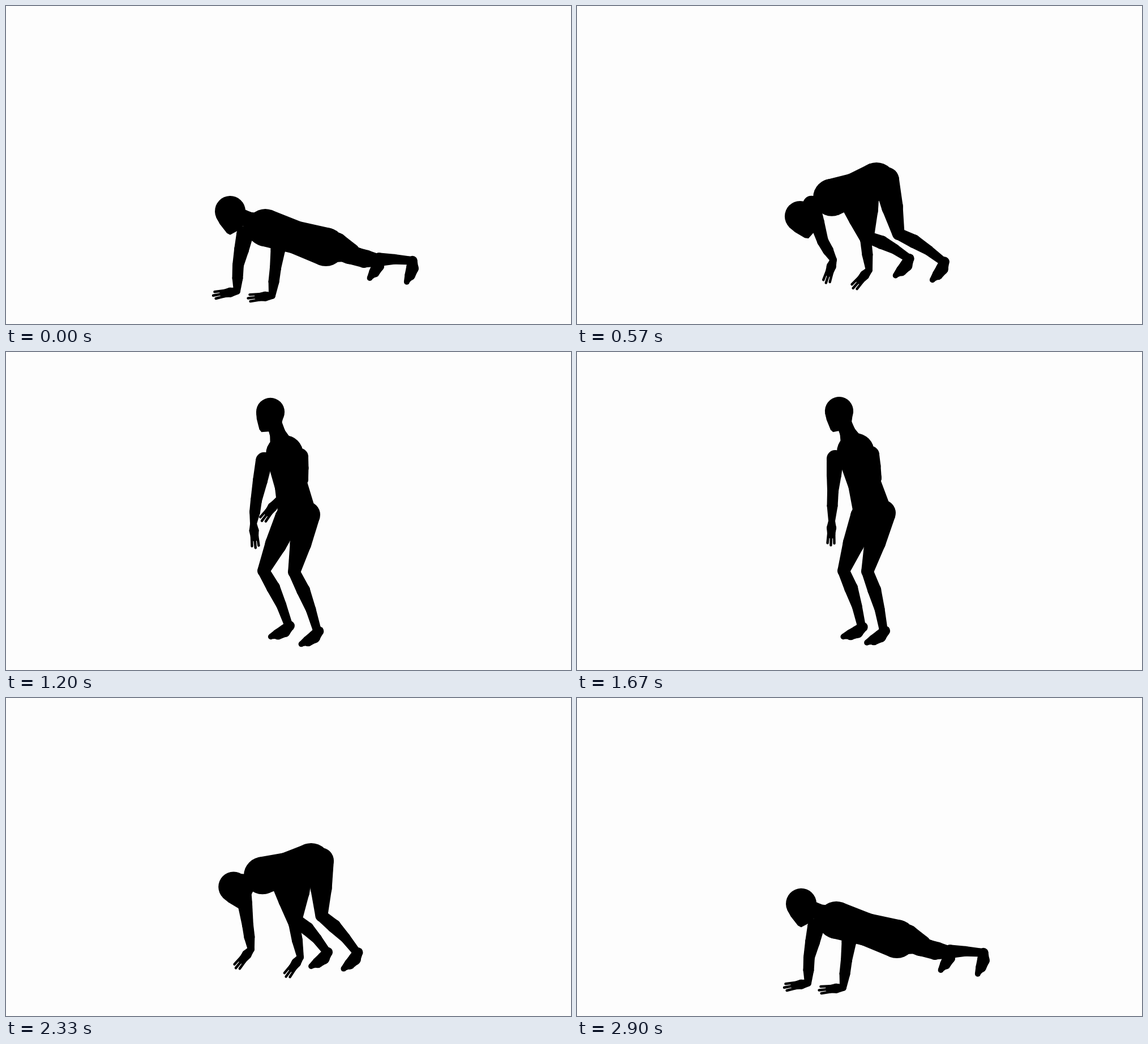
Recreate the animation shown at these times as an HTML page with a canvas. Size 998x561 px, loop 2.93 s.

```html
<!DOCTYPE html>
<html lang="en">
<head>
<meta charset="utf-8">
<title>Burpee</title>
<style>
html, body { margin: 0; width: 100%; height: 100%; overflow: hidden; background: #fdfdfd; }
canvas { display: block; }
</style>
</head>
<body>
<canvas id="stage" width="998" height="561"></canvas>
<script>
const ctx = document.getElementById('stage').getContext('2d');
const LOOP = 2930, FLOOR = 505, RAD = Math.PI / 180;

// upper: head, chest, far elbow and wrist, near elbow and wrist, head tilt, wrist bend.
// legs: pelvis, far knee and ankle, near knee and ankle.
// Shoulders, hips, hands and feet follow from these.
const plank = {
  upper: [396, 362, 458, 391, 410, 457, 408, 503, 476, 462, 470, 511, -24, 77],
  legs: [565, 425, 605, 440, 655, 444, 632, 451, 713, 449]
};
const spring = {
  upper: [394, 371, 450, 338, 434, 415, 453, 448, 510, 412, 516, 466, -45, 48],
  legs: [529, 310, 514, 408, 583, 443, 568, 402, 645, 449]
};
const twist = {
  upper: [467, 106, 492, 180, 442, 262, 437, 303, 524, 225, 478, 264, 0, -12],
  legs: [515, 290, 455, 386, 498, 479, 509, 388, 549, 489]
};
const ready = {
  upper: [463, 104, 492, 176, 452, 245, 450, 298, 528, 222, 515, 275, -8, 0],
  legs: [523, 287, 471, 386, 502, 481, 513, 387, 541, 488]
};
const fold = {
  upper: [414, 214, 482, 245, 448, 318, 453, 375, 512, 300, 484, 374, -40, -5],
  legs: [550, 299, 481, 389, 503, 481, 522, 387, 541, 488]
};
const dive = {
  upper: [402, 333, 453, 313, 427, 400, 433, 443, 509, 398, 520, 457, -45, 47],
  legs: [539, 290, 512, 391, 564, 445, 557, 384, 617, 446]
};

// Raises every point in proportion to its height above the floor.
function stretch(pose, k) {
  const lift = (list, points) => list.map((v, i) => i % 2 && i < points ? v + k * (v - FLOOR) : v);
  return { upper: lift(pose.upper, 12), legs: lift(pose.legs, 10) };
}

const high = stretch(plank, .03), low = stretch(plank, -.04), tall = stretch(ready, .055);
const upperKeys = [[0, plank], [160, high], [370, high], [570, spring], [1020, fold], [1200, twist],
  [1430, tall], [1670, ready], [1970, fold], [2330, dive], [2620, low], [2710, low]];
const legKeys = [[0, plank], [420, plank], [570, spring], [740, fold], [1020, fold], [1200, twist],
  [1430, tall], [1670, ready], [1970, fold], [2190, fold], [2330, dive], [2540, plank]];

// Smooth curve through the looping keys, without overshoot.
function sample(keys, part, t) {
  const n = keys.length;
  let i = n - 1;
  while (keys[i][0] > t) i--;
  const [a, b, c, d] = [i - 1, i, i + 1, i + 2].map(k => {
    const [time, pose] = keys[(k + n) % n];
    return { time: time + Math.floor(k / n) * LOOP, at: pose[part] };
  });
  const span = c.time - b.time, u = (t - b.time) / span;
  const slope = (p, q, j) => (q.at[j] - p.at[j]) / (q.time - p.time);
  const tangent = (s, r) => s * r > 0 ? 2 * s * r / (s + r) : 0;
  return b.at.map((from, j) => {
    const mid = slope(b, c, j), gap = c.at[j] - from;
    const m0 = tangent(slope(a, b, j), mid) * span;
    const m1 = tangent(mid, slope(c, d, j)) * span;
    return from + u * (m0 + u * (3 * gap - 2 * m0 - m1 + u * (m0 + m1 - 2 * gap)));
  });
}

const pairs = list => Array.from({ length: list.length / 2 }, (_, i) => [list[2 * i], list[2 * i + 1]]);
const shift = ([x, y], dx, dy) => [x + dx, y + dy];
const angle = (a, b) => Math.atan2(b[1] - a[1], b[0] - a[0]) / RAD;
const reach = ([x, y], deg, len) => [x + Math.cos(deg * RAD) * len, y + Math.sin(deg * RAD) * len];

function fill(points) {
  ctx.beginPath();
  points.forEach(p => ctx.lineTo(...p));
  ctx.fill();
}

function disc(p, r) {
  ctx.beginPath();
  ctx.arc(...p, r, 0, 7);
  ctx.fill();
}

// Maps a share along a-b and a sideways offset to the stage.
function along(a, b) {
  const dx = b[0] - a[0], dy = b[1] - a[1], len = Math.hypot(dx, dy) || 1;
  return (u, v) => [a[0] + dx * u - dy / len * v, a[1] + dy * u + dx / len * v];
}

// Tapered body part; each ring is a radius and a shift towards the back.
function limb(a, b, ...rings) {
  const at = along(a, b), left = [], right = [];
  rings.forEach(([r, back = 0], i) => {
    const u = i / (rings.length - 1);
    left.push(at(u, r - back));
    right.unshift(at(u, -r - back));
    disc(at(u, -back), r);
  });
  fill([...left, ...right]);
}

function arm(shoulder, elbow, wrist, bend) {
  limb(shoulder, elbow, [15], [13], [10]);
  limb(elbow, wrist, [10], [9.5], [6]);
  const at = along(wrist, reach(wrist, angle(elbow, wrist) + bend, 44));
  limb(wrist, at(.55, 0), [6], [8.5], [7]);
  for (const side of [-1, 0, 1]) {
    ctx.beginPath();
    ctx.moveTo(...at(.5, side * 5));
    ctx.lineTo(...at(.97 - .08 * side * side, side * 6));
    ctx.stroke();
  }
}

function leg(hip, knee, ankle, turn) {
  limb(hip, knee, [23], [19], [11]);
  limb(knee, ankle, [10.5], [12, 3], [9, 3], [7.5]);
  // The foot gives way to about half the tilt of the shin.
  const toe = reach(ankle, 100 + turn + .55 * angle(knee, ankle), 38);
  limb(ankle, toe, [9, 5], [11, 7], [9.5, 5], [5, 1]);
}

function head([x, y], tilt) {
  ctx.save();
  ctx.translate(x, y);
  ctx.rotate(tilt * RAD);
  ctx.scale(.9 + y / 3600, .9 + y / 3600);
  disc([0, 0], 27);
  fill(pairs([-27, 0, -26, 13, -21, 33, -17, 38, -2, 37, 19, 30, 26, 5]));
  ctx.restore();
}

function draw(t) {
  const upper = sample(upperKeys, 'upper', t);
  const bend = upper.pop(), tilt = upper.pop();
  const [skull, chest, farElbow, farWrist, nearElbow, nearWrist] = pairs(upper);
  const [pelvis, farKnee, farAnkle, nearKnee, nearAnkle] = pairs(sample(legKeys, 'legs', t));

  ctx.fillStyle = '#fdfdfd';
  ctx.fillRect(0, 0, 998, 561);
  ctx.fillStyle = ctx.strokeStyle = '#000';
  ctx.lineWidth = 4.5;
  ctx.lineCap = 'round';
  leg(shift(pelvis, -17, 3), farKnee, farAnkle, 8);
  leg(shift(pelvis, 17, -3), nearKnee, nearAnkle, 0);
  limb(chest, pelvis, [33], [29], [34]);
  limb(chest, skull, [26], [14], [13]);
  arm(shift(chest, -36, 12), farElbow, farWrist, bend);
  arm(shift(chest, 27, 5), nearElbow, nearWrist, bend);
  head(skull, tilt);
}

const start = performance.now();
function tick() {
  draw((performance.now() - start) % LOOP);
  requestAnimationFrame(tick);
}
tick();
</script>
</body>
</html>
```
